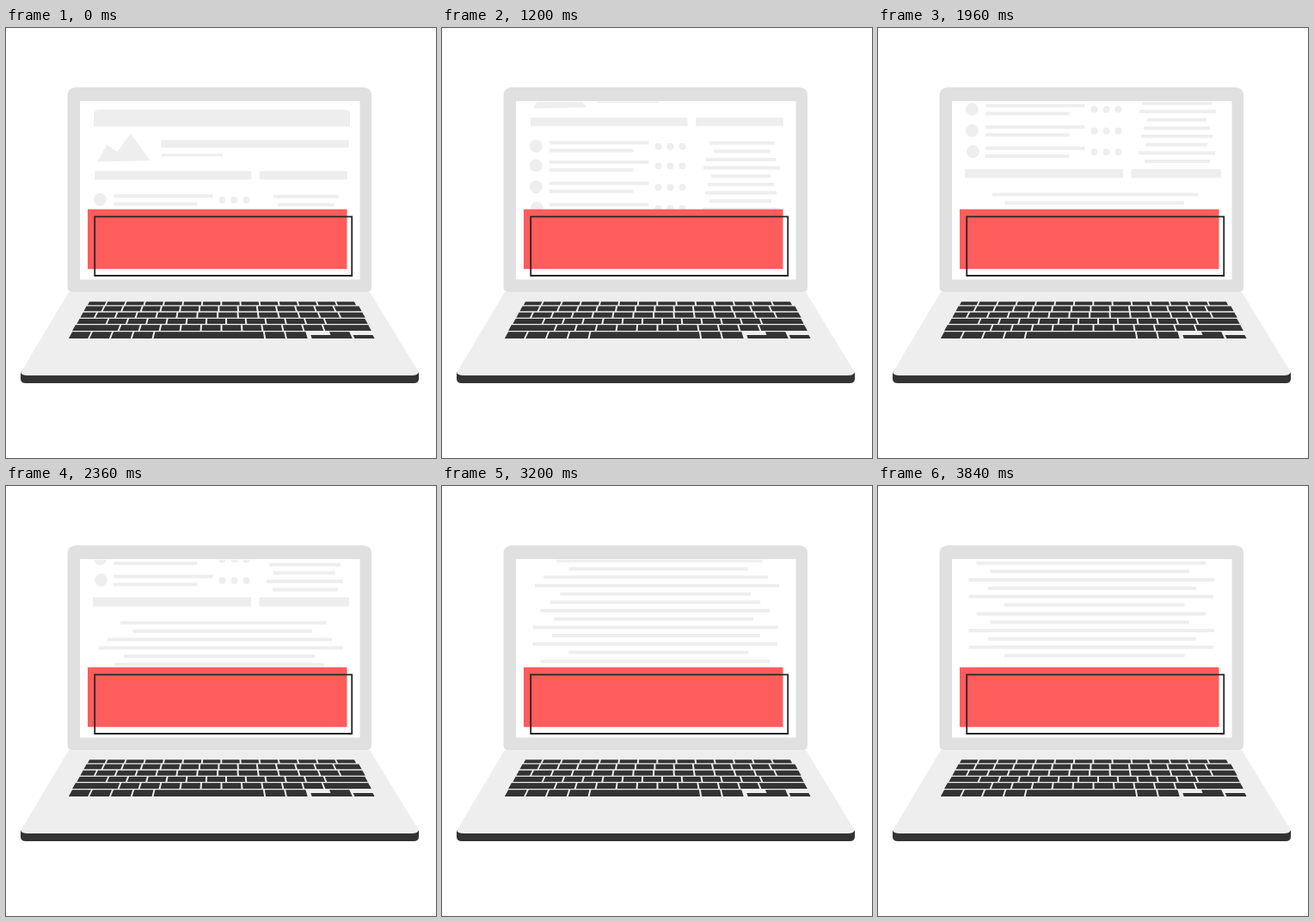
Recreate the animation shown at these times as an HTML page. Size 500x500 px, loop 5800 ms.

```html
<!DOCTYPE html>
<html lang="en">
<head>
<meta charset="utf-8">
<title>Laptop with scrolling page</title>
<style>
  html, body { margin: 0; width: 100%; height: 100%; overflow: hidden; background: #fff; }
  svg { display: block; width: 100%; height: 100%; }
</style>
</head>
<body>
<svg viewBox="0 0 500 500">
  <clipPath id="view"><rect x="86" y="85.7" width="325" height="126"/></clipPath>
  <path fill="#e0e0e0" d="M71.5 79q0-10 10-10H415q10 0 10 10V301q0 6-6 6H77.5q-6 0-6-6z"/>
  <path fill="#fff" d="M86 85H411.500V292.500H86z"/>
  <g clip-path="url(#view)"><g id="page" fill="#eee"></g></g>
  <path fill="#ff5c5c" d="M95 210.800H396.500V280.300H95z"/>
  <path fill="none" stroke="#262626" stroke-width="1.8" d="M103.200 219.300H402.200V288H103.200z"/>
  <path fill="#333" d="M17 400H480V408q0 5-6 5H23q-6 0-6-5z"/>
  <path fill="#eee" d="M73 307H423L480 400.500Q478 404 472 404H25Q19 404 17 401z"/>
  <path id="keys" fill="#333"/>
</svg>
<script>
const page = document.getElementById('page');
let shapes = '';
const bar = (x1, x2, y, h = 4, r = 0) =>
  shapes += `<rect x="${x1}" y="${y - h / 2}" width="${x2 - x1}" height="${h}" rx="${r}"/>`;
const dot = (x, y, r) => shapes += `<circle cx="${x}" cy="${y}" r="${r}"/>`;

// Header, picture and first headings
shapes += '<path d="M102 114.500V101q0-6 6-6H394q6 0 6 6V114.500z"/>' +
  '<path d="M106 155.500L117.500 135.500L129 144L145 123L168 154.300z"/>';
bar(180.5, 398.5, 134.7, 9);
bar(180.5, 252, 147.7, 3);
bar(103, 285.5, 171.3, 10);
bar(295, 397, 171.3, 10);

// List rows
[199.4, 222, 246.8, 271.4].forEach((y, i) => {
  dot(i < 3 ? 109.3 : 110.4, y, 7.4);
  bar(125, 240.5, y - 4);
  bar(125, 222.5, y + 5.2);
  for (let k = 0; k < 3; k++) dot(251.5 + 14 * k, y + .5, 4);
});

// Side column
[[311, 386.5], [316, 381.5], [307, 388], [304, 393], [313, 382],
 [309, 386], [306, 389], [311, 383], [303, 392], [310, 386]]
  .forEach(([a, b], i) => bar(a, b, 195.8 + 9.65 * i));

// Second headings and centred text
bar(101, 285, 296.8, 10.5);
bar(294.5, 399, 296.8, 10.5);
const lines = [[133, 372.5], [147.5, 356], [118, 379], [108, 392], [137.5, 359], [126, 370],
  [114.5, 381], [130.5, 362], [105.5, 391], [128, 370], [105.5, 390], [147, 356.5]];
[...lines, ...lines.slice(6)].forEach(([a, b], i) =>
  bar(a, b, 321.3 + 9.7 * i + (i > 11 ? .8 : 0)));
page.innerHTML = shapes;

// Keys lean along lines that spread towards the viewer
let keys = '';
const halfWidth = y => 154 + (y - 318) * .547;
function key(x1, x2, top, bottom) {
  const mid = (top + bottom) / 2;
  const at = (x, y) => `${(250.5 + (x - 250.5) * halfWidth(y) / halfWidth(mid)).toFixed(2)} ${y}`;
  keys += `M${at(x1, top)}L${at(x2, top)}L${at(x2, bottom)}L${at(x1, bottom)}z`;
}
function row(top, bottom, left, first, step, count, right) {
  const edges = [left];
  for (let i = 0; i <= count; i++) edges.push(first + step * i);
  edges.push(right);
  for (let i = 1; i < edges.length; i++)
    key(edges[i - 1] + (i > 1 ? 1 : 0), edges[i] - (i < edges.length - 1 ? 1 : 0), top, bottom);
}
row(318.3, 322.3, 96, 116.5, 22.3, 12, 406);
row(323.5, 329.3, 92, 113, 22.4, 12, 412);
row(330.8, 336.8, 88, 104.5, 23.6, 12, 416);
row(338, 344, 84, 118, 23, 11, 419);
row(345.2, 352, 79, 132, 23.7, 10, 423);
row(353.3, 361, 75, 98, 24.5, 3, 299.5);
key(301.5, 324, 353.3, 361);
key(326, 349.5, 353.3, 361);
key(355, 378.5, 357, 361);
key(377.5, 401, 353.3, 361);
key(404.5, 427.5, 357, 361);
document.getElementById('keys').setAttribute('d', keys);

// Steady scroll in 40 ms steps, then a rest
const LOOP = 5800, START = 480, STEP = 40, STEPS = 84, DISTANCE = 289.8;
const begin = performance.now();
function draw(now) {
  const t = Math.max(0, now - begin) % LOOP;
  const n = Math.min(STEPS, Math.max(0, Math.floor((t - START) / STEP)));
  page.setAttribute('transform', `translate(0 ${-DISTANCE * n / STEPS})`);
  requestAnimationFrame(draw);
}
draw(begin);
</script>
</body>
</html>
```
